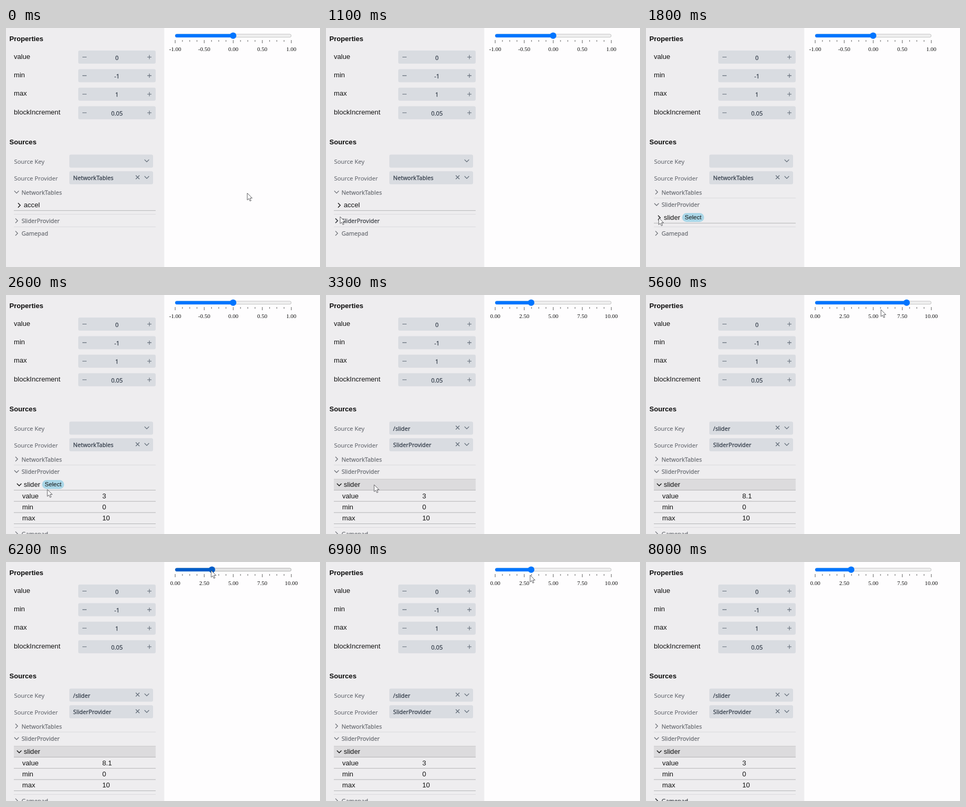
Recreate the animation shown at these times as an HTML page. Size 600 px wide and 456 px high, loop 8600 ms.

```html
<!DOCTYPE html>
<html lang="en">
<head>
<meta charset="utf-8">
<title>Slider properties</title>
<style>
html, body { margin: 0; width: 100%; height: 100%; overflow: hidden; background: #fefdfe; }
svg { display: block; width: 600px; height: 456px; }
text { white-space: pre; }
.arial { font: 13.1px "Liberation Sans", Arial, sans-serif; fill: #111; }
.title { font: bold 13.1px "Liberation Sans", Arial, sans-serif; fill: #0a0a0a; }
.pill { font: 11.5px "Liberation Sans", Arial, sans-serif; fill: #111; }
.field, .head, .label { font: 500 11.15px "Open Sans", "Noto Sans", sans-serif; stroke-width: .28px; }
.field { fill: #303a47; stroke: #303a47; }
.head { fill: #6b6e74; stroke: #6b6e74; }
.label { font-size: 11.35px; fill: #62666d; stroke: #62666d; stroke-width: .12px; }
.hot { fill: #3c4047; stroke: #3c4047; }
.axis { font: 11px "Liberation Serif", "Times New Roman", serif; fill: #111; }
.mid { text-anchor: middle; }
</style>
</head>
<body>
<svg id="stage" viewBox="0 0 600 456"></svg>
<script>
const LOOP = 8600, STEP = 100;
const OPEN = 1300, EXPAND = 2300, SELECT = 3300;
const GRAB = 4200, DROP = 5200, CLICK = 6000, SETTLE = 6400;
const LAG = 300;
const DARK = '#b3b3b5', LIGHT = '#d9d9dd', INK = '#626c78';

// pointer moves: begin, end, x, y
const MOVES = [
  [200, 900, 60, 379], [900, 1100, 27, 360], [1300, 2100, 23, 363],
  [2400, 2600, 79, 371], [2600, 3100, 92, 362], [3500, 3700, 343, 58],
  [3900, GRAB, 396, 16], [4400, DROP, 502, 16], [5300, 5600, 449, 28],
  [5600, 5900, 385, 78], [5900, CLICK, 392, 16],
  [6800, 6900, 390, 25], [7100, 7400, 169, 259], [7500, 7800, 70, 460]
];

const clamp = (v, lo, hi) => Math.min(hi, Math.max(lo, v));
const ease = f => f * f * (3 - 2 * f);

function pointer(t) {
  let x = 461, y = 315;
  for (const [begin, end, toX, toY] of MOVES) {
    const f = ease(clamp((t - begin) / (end - begin), 0, 1));
    x += (toX - x) * f;
    y += (toY - y) * f;
  }
  return { x, y };
}

// the thumb follows the pointer while it is held
function thumb(t) {
  if (t < SELECT) return 434;
  if (t >= CLICK) return t < SETTLE ? 393.5 : 392;
  return pointer(clamp(t, GRAB, DROP)).x - 4;
}

const value = t => +((thumb(Math.max(SELECT, t - LAG)) - 329) / 20.9).toFixed(1);
const inside = (p, x, y, w, h) => p.x > x && p.x < x + w && p.y > y && p.y < y + h;

const text = (x, y, s, cls = 'arial') => `<text x="${x}" y="${y}" class="${cls}">${s}</text>`;
const rect = (x, y, w, h, fill, r = 0) =>
  `<rect x="${x}" y="${y}" width="${w}" height="${h}" rx="${r}" fill="${fill}"/>`;
const path = (d, color, w = 1.25) =>
  `<path d="${d}" fill="none" stroke="${color}" stroke-width="${w}"/>`;
const rule = (y, color) => path(`M15 ${y}H286`, color, 1);
const chevron = (x, y, open, color, w) => path(open
  ? `M${x - 4.3} ${y - 2.2}l4.3 4.3 4.3-4.3`
  : `M${x - 2.2} ${y - 4.3}l4.3 4.3-4.3 4.3`, color, w);

function numberField([label, number], i) {
  const y = 55.5 + i * 35.4;
  return text(15, 59 + i * 35.2, label) + rect(138, y - 12.5, 148, 25, '#d9dce1', 3) +
    path(`M146 ${y}h8M270 ${y}h8M274 ${y - 4}v8`, INK, 1.1) +
    text(212, y + 5, number, 'field mid');
}

function dropdown(label, choice, y) {
  const cross = choice ? path(`M248 ${y - 4.5}l7 7M255 ${y - 4.5}l-7 7`, INK) : '';
  return text(15.5, y + 4.8, label, 'label') + rect(121, y - 12.5, 160, 25, '#d9dce1', 3) +
    text(128.3, y + 4.7, choice, 'field') + cross + chevron(269, y - 0.7, true, INK);
}

function header(label, y, open, p) {
  const hot = inside(p, 15, y - 11.5, 271, 23);
  return chevron(20.2, y - 0.3, open, hot ? '#33373d' : '#70737a', hot ? 1.6 : 1.3) +
    text(29.7, y + 4.3, label, hot ? 'head hot' : 'head');
}

const branch = (label, y, open) => chevron(25.2, y, open, '#111', 1.35) + text(34, y + 4, label);

function sliderRow(t, p) {
  const selected = t >= SELECT, expanded = t >= EXPAND;
  const lineY = i => 372.3 + i * 21.4;
  let s = selected ? rect(15, 351, 271, 21.3, '#dcdbdd') + rule(351.3, '#cbcacc') : '';
  s += branch('slider', 362, expanded) + rule(lineY(0), DARK);
  if (!selected && inside(p, 15, 351, 271, 22))
    s += rect(69, 353, 42, 17, '#a9d6e7', 8.5) + text(74, 365.3, 'Select', 'pill');
  if (!expanded) return s;
  return s + [['value', value(t)], ['min', 0], ['max', 10]].map(([name, v], i) => {
    const y = 387.5 + i * 21.4;
    return text(31, y, name) + text(184, y, v) + rule(lineY(i + 1), DARK);
  }).join('');
}

function accordion(t, p) {
  const open = t >= OPEN, expanded = t >= EXPAND;
  const body = open
    ? rule(324.3, LIGHT) + sliderRow(t, p)
    : branch('accel', 338.2, false) + rule(348.3, DARK) + rule(355.3, LIGHT);
  return header('NetworkTables', 313.3, !open, p) + body +
    header('SliderProvider', open ? 337 : 368, open, p) +
    rule(expanded ? 443.4 : 379.4, LIGHT) + header('Gamepad', expanded ? 456 : 392, false, p);
}

function slider(t, p) {
  const x = thumb(t);
  const active = (t >= GRAB && t <= DROP) || (t >= CLICK && t < CLICK + 200);
  const [fill, bed, edge] = active ? ['#3793ff', '#f5f5f5', '#c6c6c6']
    : inside(p, 320, 7, 228, 14) ? ['#005cc8', '#e5e5e5', '#a2a2a2']
    : ['#0075ff', '#efefef', '#b9b9b9'];
  let s = `<rect x="323.6" y="11.8" width="221.4" height="5.8" rx="2.9" fill="${bed}" stroke="${edge}" stroke-width=".8"/>` +
    rect(323.2, 11.4, x - 323.2, 6.6, fill, 3.2) +
    `<circle cx="${x}" cy="14.6" r="6.2" fill="${fill}"/>`;
  for (let i = 0; i <= 16; i++) {
    const major = i % 4 === 0, tx = 323.3 + i * 13.87;
    s += path(`M${tx} 23V${major ? 29 : 26.2}`, '#7d7d7d');
    if (major) s += text(tx, 44, (t >= SELECT ? i / 1.6 : i / 8 - 1).toFixed(2), 'axis mid');
  }
  return s;
}

function scene(t) {
  const p = pointer(t), on = t >= SELECT;
  const fields = [['value', '0'], ['min', '-1'], ['max', '1'], ['blockIncrement', '0.05']];
  return rect(0, 0, 600, 456, '#fefdfe') + rect(0, 0, 302.4, 456, '#eeedef') +
    text(6.5, 24.5, 'Properties', 'title') + fields.map(numberField).join('') +
    text(6.5, 222, 'Sources', 'title') +
    dropdown('Source Key', on ? '/slider' : '', 254) +
    dropdown('Source Provider', on ? 'SliderProvider' : 'NetworkTables', 285.7) +
    accordion(t, p) + slider(t, p) +
    `<path transform="translate(${p.x} ${p.y})" d="M0 0V13.2L3 10.5 5.2 15.2 7.3 14.3 5.2 9.6H9.4Z" fill="#fff" stroke="#4a4a4e" stroke-width=".9"/>`;
}

const stage = document.getElementById('stage');
const start = performance.now();
let last = -1;

function tick(now) {
  const t = Math.floor((Math.max(0, now - start) % LOOP) / STEP) * STEP;
  if (t !== last) stage.innerHTML = scene(last = t);
  requestAnimationFrame(tick);
}
tick(start);
</script>
</body>
</html>
```
